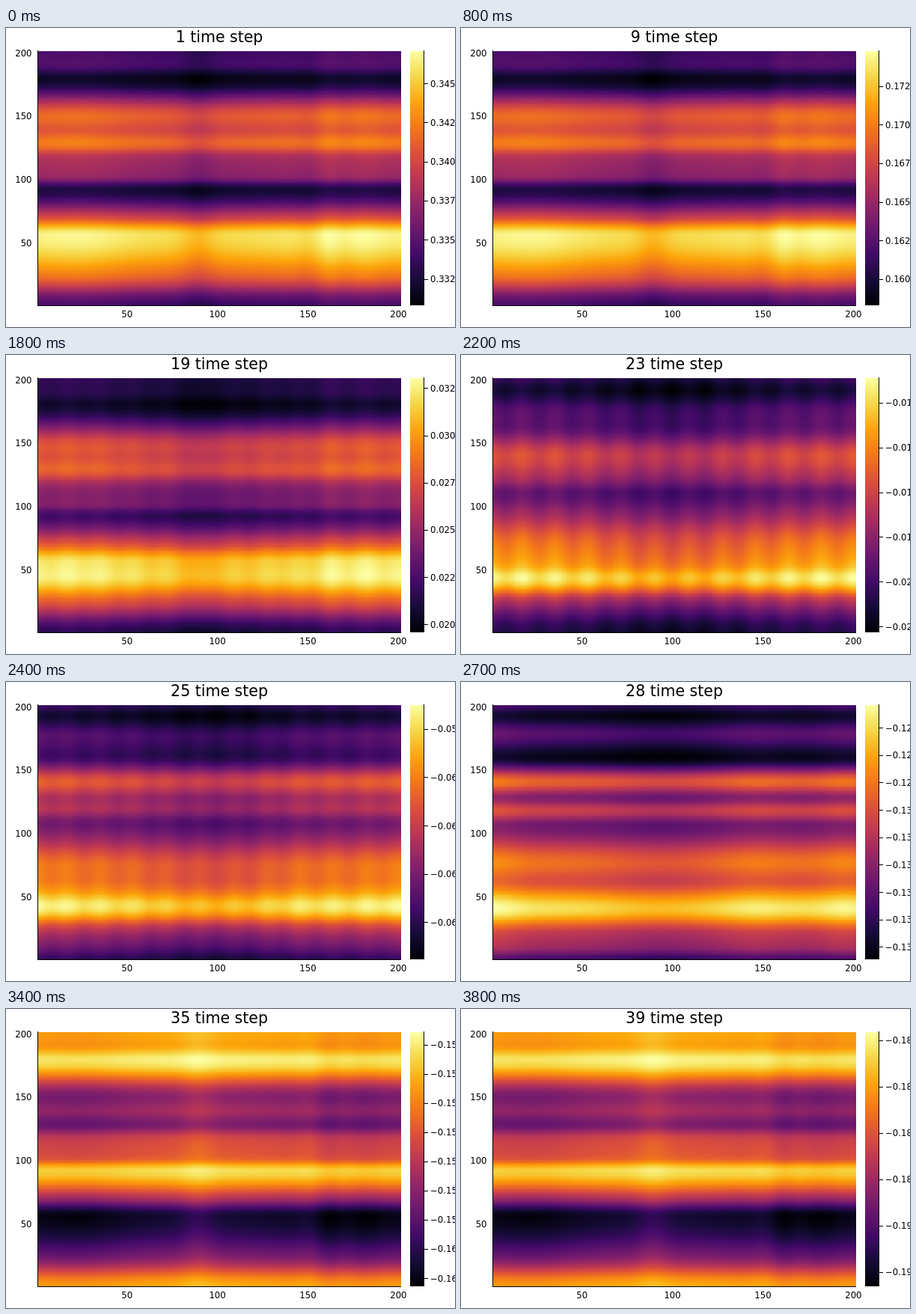
An HTML page with a canvas that plays this animation: 600x400 px, repeating every 3.9 s.

```html
<!DOCTYPE html>
<html>
<head>
<meta charset="utf-8">
<style>
  html, body { margin: 0; width: 600px; height: 400px; overflow: hidden; background: #fff; }
  canvas { display: block; }
</style>
</head>
<body>
<canvas id="stage" width="600" height="400"></canvas>
<script>
const ctx = document.getElementById('stage').getContext('2d');
const STEPS = 39, STEP_MS = 100, N = 201;
const LEFT = 42, TOP = 31, WIDTH = 486, HEIGHT = 341;

const inferno = ['000004', '160b39', '420a68', '6a176e', '932667', 'bc3754',
  'dd513a', 'f37819', 'fca50a', 'f6d746', 'fcffa4']
  .map(hex => [0, 2, 4].map(i => parseInt(hex.slice(i, i + 2), 16)));

const mix = (a, b, k) => a + (b - a) * k;

// Monotone cubic curve through [position, value] points
function curve(points) {
  const slope = points.slice(1).map(([p, v], i) => (v - points[i][1]) / (p - points[i][0]));
  const tangent = points.map((_, i) => {
    const a = slope[i - 1], b = slope[i];
    return a * b > 0 ? 2 * a * b / (a + b) : 0;
  });
  return p => {
    let i = 0;
    while (i < points.length - 2 && p > points[i + 1][0]) i++;
    const [p0, v0] = points[i], [p1, v1] = points[i + 1];
    const h = p1 - p0, u = (p - p0) / h, w = u * u * (3 - 2 * u);
    return mix(v0, v1, w) + h * u * (1 - u) * ((1 - u) * tangent[i] - u * tangent[i + 1]);
  };
}

// Sum of Gaussians given as [centre, width, height]
const bumps = list => x =>
  list.reduce((sum, [c, w, h]) => sum + h * Math.exp(-(((x - c) / w) ** 2)), 0);

// Horizontal bands, shifted from column to column; bright bands shift more
function field(rowAt, colAt) {
  const cells = new Float32Array(N * N);
  for (let y = 0; y < N; y++) {
    const row = rowAt((y + 0.5) * HEIGHT / N);
    for (let x = 0; x < N; x++) {
      cells[y * N + x] = row + colAt((x + 0.5) * WIDTH / N) * (0.5 + row / 200);
    }
  }
  return cells;
}

const early = field(
  curve([[0, 20], [17, 22], [37, 4], [88, 66], [105, 60], [123, 70], [143, 46],
    [168, 39], [185, 9], [222, 56], [246, 97], [300, 69], [341, 20]]),
  bumps([[60, 50, 3], [215, 22, -7], [225, 130, -6], [360, 16, -3], [390, 15, 5], [437, 25, 4]]));

const sag = bumps([[240, 120, -14]]);
const rippled = field(
  curve([[0, 17], [15, 10], [45, 26], [65, 28], [104, 58], [134, 45], [154, 29],
    [180, 42], [214, 66], [250, 80], [267, 94], [300, 45], [341, 14]]),
  x => sag(x) + 3.8 * Math.cos(2 * Math.PI * (x - 40) / 44.4));

const banded = field(
  curve([[0, 18], [14, 5], [38, 25], [70, 4], [103, 65], [124, 36], [141, 55],
    [161, 32], [212, 69], [234, 60], [272, 94], [305, 52], [325, 42], [341, 20]]),
  bumps([[0, 40, 8], [225, 80, -8], [350, 40, 4], [470, 30, 6]]));

const late = early.map(v => 100 - v);

function fieldAt(step) {
  const [a, b, k] =
    step < 23 ? [early, rippled, ((step - 1) / 22) ** 5] :
    step < 28 ? [rippled, banded, (step - 23) / 5] :
    [banded, late, Math.min(1, (step - 28) / 4)];
  return a.map((v, i) => mix(v, b[i], k));
}

// Highest value and extent of the colour scale
const scales = [
  { at: 1, high: 0.34706, span: 0.0163 },
  { at: 9, high: 0.17478, span: 0.01655 },
  { at: 19, high: 0.03303, span: 0.01349 },
  { at: 23, high: -0.0109, span: 0.0114 },
  { at: 28, high: -0.12618, span: 0.0093 },
  { at: 32, high: -0.13077, span: 0.00703 },
  { at: 39, high: -0.18165, span: 0.011 }
];

function scaleAt(step) {
  const i = Math.max(1, scales.findIndex(s => s.at >= step));
  const a = scales[i - 1], b = scales[i], k = (step - a.at) / (b.at - a.at);
  return { high: mix(a.high, b.high, k), span: mix(a.span, b.span, k) };
}

const palette = Array.from({ length: 512 }, (_, n) => {
  const p = n / 511 * 10, i = Math.min(9, Math.floor(p));
  return inferno[i].map((c, k) => mix(c, inferno[i + 1][k], p - i));
});

const grid = document.createElement('canvas');
grid.width = grid.height = N;
const gridCtx = grid.getContext('2d');
const image = gridCtx.createImageData(N, N);

function drawField(step) {
  const values = fieldAt(step);
  let low = Infinity, high = -Infinity;
  for (const v of values) {
    low = Math.min(low, v);
    high = Math.max(high, v);
  }
  values.forEach((v, i) => {
    const rgb = palette[Math.round((v - low) / (high - low) * 511)];
    image.data.set([...rgb, 255], i * 4);
  });
  gridCtx.putImageData(image, 0, 0);
  ctx.imageSmoothingEnabled = false;
  ctx.drawImage(grid, LEFT, TOP, WIDTH, HEIGHT);
}

function text(str, x, y, align, size = 11.7) {
  ctx.font = size + 'px "DejaVu Sans", sans-serif';
  ctx.textAlign = align;
  ctx.fillText(str, x, y);
}

function drawAxes() {
  ctx.fillRect(LEFT, TOP - 1, 1, HEIGHT + 1);
  ctx.fillRect(LEFT, TOP + HEIGHT - 1, WIDTH, 1);
  for (const v of [50, 100, 150, 200]) {
    text(v, LEFT + (v - 0.5) * WIDTH / N, 387, 'center');
    text(v, 34.5, TOP + HEIGHT - (v - 0.5) * HEIGHT / N + 4, 'right');
  }
}

const barFill = ctx.createLinearGradient(0, TOP + HEIGHT - 1, 0, TOP);
inferno.forEach((rgb, i) => barFill.addColorStop(i / 10, `rgb(${rgb})`));

function drawColorbar(step) {
  ctx.fillStyle = barFill;
  ctx.fillRect(540, TOP, 18, HEIGHT - 1);
  ctx.fillStyle = '#000';
  ctx.fillRect(558, TOP - 1, 1, HEIGHT);
  const { high, span } = scaleAt(step);
  const unit = span < 0.0095 ? 0.001 : span < 0.012 ? 0.002 : 0.0025;
  for (let i = Math.ceil((high - span) / unit); i * unit <= high; i++) {
    const y = TOP + (high - i * unit) / span * HEIGHT;
    ctx.fillRect(559, Math.round(y), 5, 1);
    text((i * unit).toFixed(4).replace('-', '\u2212'), 567, y + 4.5, 'left');
  }
}

let shown = 0;
function frame() {
  const step = Math.floor(performance.now() / STEP_MS) % STEPS + 1;
  if (step !== shown) {
    shown = step;
    ctx.fillStyle = '#fff';
    ctx.fillRect(0, 0, 600, 400);
    ctx.fillStyle = '#000';
    drawField(step);
    drawAxes();
    drawColorbar(step);
    text(step + ' time step', 285, 19, 'center', 20.5);
  }
  requestAnimationFrame(frame);
}
frame();
</script>
</body>
</html>
```
